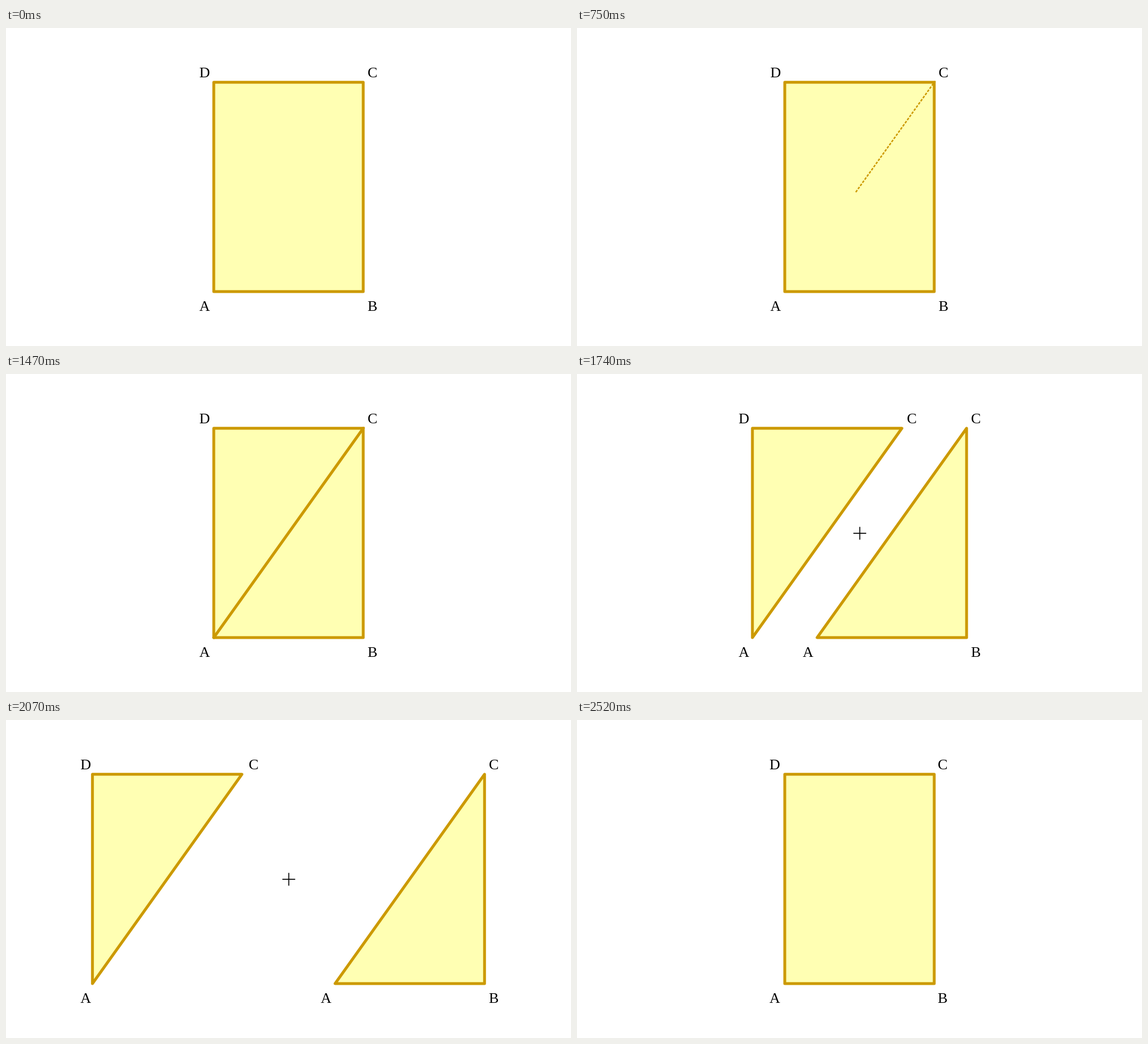
An HTML page with a canvas that plays this animation: 998x561 px, repeating every 2700 ms.

```html
<!DOCTYPE html>
<html lang="en">
<head>
<meta charset="utf-8">
<title>Rectangle split into two triangles</title>
<style>
  html, body { margin: 0; width: 100%; height: 100%; overflow: hidden; background: #fff; }
  canvas { display: block; }
</style>
</head>
<body>
<canvas id="stage" width="998" height="561"></canvas>
<script>
const ctx = document.getElementById('stage').getContext('2d');
const LOOP = 2700, STEP = 30;
const DRAW_START = 120, DRAW_END = 1320, CUT = 1470;
const SPLIT_START = 1620, SPLIT_END = 2070, JOIN_START = 2220, JOIN_END = 2520;
const SPREAD = 1500 / 7;
const LINE = '#cc9900', FILL = '#ffffb3';

const A = [367, 465], B = [631, 465], C = [631, 95.8], D = [367, 95.8];
const LABELS = { A: [341.6, 499], B: [638.8, 499], C: [638.8, 87.3], D: [341.6, 87.3] };

const progress = (t, from, to) => Math.min(1, Math.max(0, (t - from) / (to - from)));
const mix = (a, b, k) => a + (b - a) * k;

function polygon(points, dx = 0) {
  ctx.beginPath();
  for (const [x, y] of points) ctx.lineTo(x + dx, y);
  ctx.closePath();
  ctx.fill();
  ctx.stroke();
}

function segment(x1, y1, x2, y2) {
  ctx.beginPath();
  ctx.moveTo(x1, y1);
  ctx.lineTo(x2, y2);
  ctx.stroke();
}

function labels(names, dx = 0) {
  ctx.fillStyle = '#000';
  for (const name of names) ctx.fillText(name, LABELS[name][0] + dx, LABELS[name][1]);
}

function dashedDiagonal(k) {
  ctx.save();
  ctx.lineWidth = 2.5;
  ctx.lineCap = 'butt';
  ctx.setLineDash([4.5, 2.3]);
  // Dashes are counted from the moving end.
  segment(mix(C[0], A[0], k), mix(C[1], A[1], k), ...C);
  ctx.restore();
}

function plus(x, y, r) {
  ctx.save();
  ctx.strokeStyle = '#000';
  ctx.lineWidth = 1.7;
  ctx.lineCap = 'butt';
  segment(x - r, y, x + r, y);
  segment(x, y - r, x, y + r);
  ctx.restore();
}

function drawRectangle(t) {
  polygon([A, B, C, D]);
  if (t >= DRAW_START && t < SPLIT_START) {
    ctx.fillStyle = LINE;
    ctx.fillRect(C[0], C[1] - 2.5, 2.5, 2.5);
    if (t < CUT) dashedDiagonal(progress(t, DRAW_START, DRAW_END));
    else segment(...A, ...C);
  }
  labels('ABCD', t >= JOIN_END ? -1.5 : 0);
}

function drawTriangles(t) {
  const out = progress(t, SPLIT_START, SPLIT_END);
  const back = progress(t, JOIN_START, JOIN_END);
  const shift = SPREAD * (out - back);
  polygon([A, C, D], -shift);
  polygon([A, B, C], shift);
  labels('ACD', mix(-210 * out, -1.5, back));
  labels('ABC', mix(SPREAD * out, -1.5, back));
  plus(499.5, 281, 11.3);
}

function render(now) {
  const t = Math.floor((now % LOOP) / STEP) * STEP;
  ctx.fillStyle = '#fff';
  ctx.fillRect(0, 0, 998, 561);
  ctx.font = '26px "Liberation Serif", serif';
  ctx.lineWidth = 5;
  ctx.lineJoin = ctx.lineCap = 'round';
  ctx.strokeStyle = LINE;
  ctx.fillStyle = FILL;
  if (t >= SPLIT_START && t < JOIN_END) drawTriangles(t);
  else drawRectangle(t);
}

const start = performance.now();
function tick() {
  render(performance.now() - start);
  requestAnimationFrame(tick);
}
tick();
</script>
</body>
</html>
```
